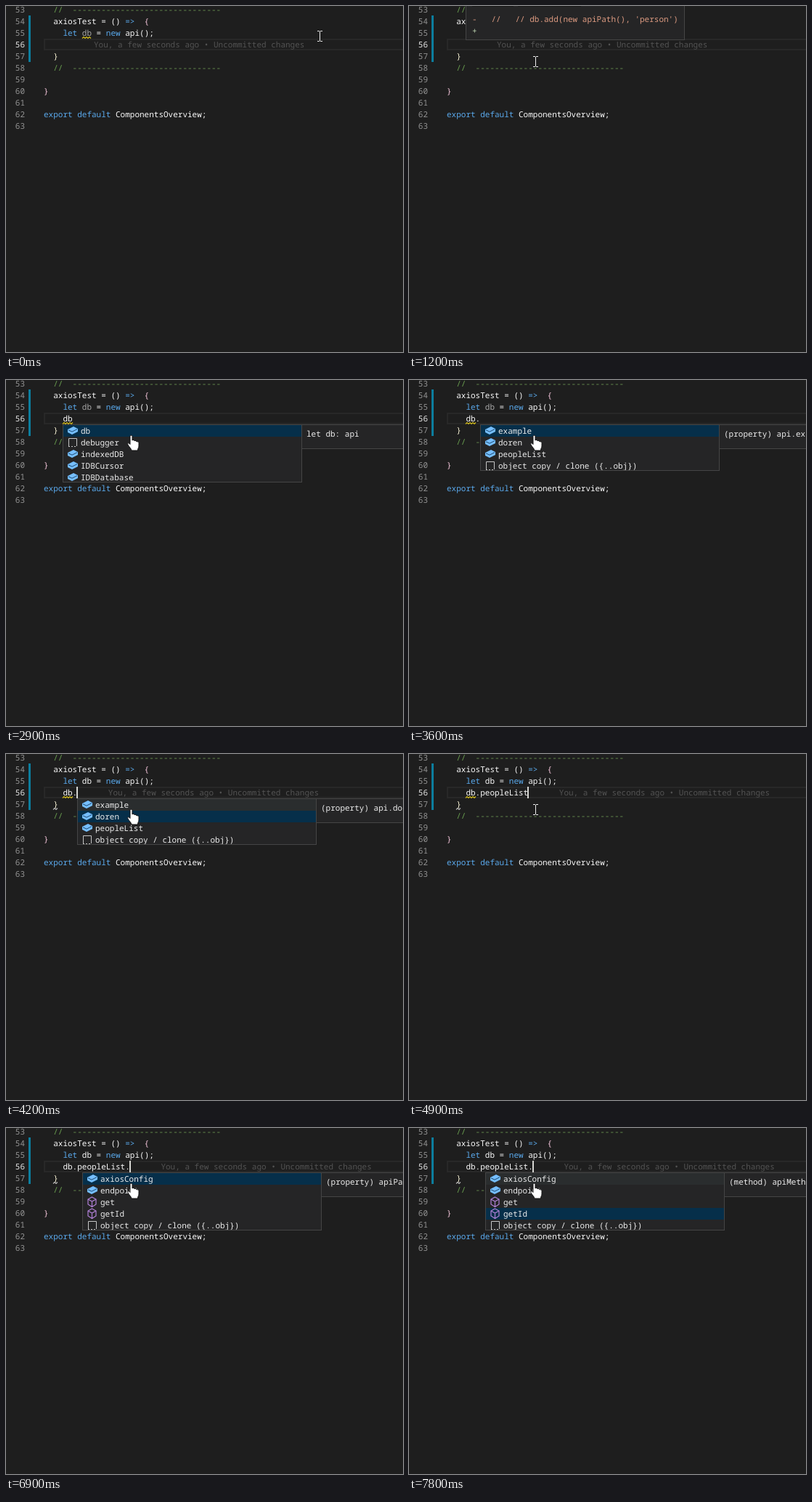
Write an HTML page that moves like this. It is 547 px wide and 476 px high and loops after 8 s.

```html
<!DOCTYPE html>
<html lang="en">
<head>
<meta charset="utf-8">
<title>Editor autocomplete</title>
<style>
html, body { margin: 0; width: 100%; height: 100%; overflow: hidden; background: #1e1e1e; }
#stage {
  position: relative; width: 547px; height: 476px; overflow: hidden; color: #fafafa;
  font: 11px/18px "Noto Sans Mono", "DejaVu Sans Mono", monospace;
  text-rendering: geometricPrecision; font-variant-ligatures: none; cursor: default;
}
#stage div, #stage svg { position: absolute; white-space: pre; box-sizing: border-box; }
#stage svg { overflow: visible; }
.num { left: 0; width: 26px; text-align: right; color: #929292; }
.num.on { color: #e6e6e6; }
.bar { left: 31px; top: 13px; width: 3px; height: 64px; background: #0c7d9d; }
.row { left: 52px; top: 45px; width: 520px; height: 16px; border: 2px solid #282828; }
.k { color: #5aa9ec; }
.c { color: #6a9f50; }
.d { color: #6a9352; }
.p { color: #f6c6dc; }
.y { color: #f4efd2; }
.dim { color: #a6a6a6; }
.note { color: #535353; }
.caret { top: 45px; width: 2px; height: 16px; background: #d6d6d2; }
.box { background: #252526; border: 1px solid #454545; overflow: hidden; }
.box .item { color: #ececec; }
.sel { background: #062f4a; }
.hov { background: #2a2d2e; }
.edge { background: #191919; }
.old { color: #dc9a80; }
.new { color: #c0d8b4; }
</style>
</head>
<body>
<div id="stage"><div id="text"></div><div id="live"></div></div>
<script>
const LOOP = 8000, X0 = 52, CW = 6.6, TOP = 45;
const BLAME = 'You, a few seconds ago \u2022 Uncommitted changes';
const COPY = ['snip', 'object copy / clone ({..obj})'];

const lists = {
  word: { x: 78, rows: [['field', 'db'], ['snip', 'debugger'], ['field', 'indexedDB'],
    ['field', 'IDBCursor'], ['field', 'IDBDatabase']], docs: ['let db: api'] },
  api: { x: 98, rows: [['field', 'example'], ['field', 'doren'], ['field', 'peopleList'], COPY],
    docs: ['(property) api.example', '(property) api.doren', '(property) api.peopleList'] },
  path: { x: 105, rows: [['field', 'axiosConfig'], ['field', 'endpoint'], ['cube', 'get'],
    ['cube', 'getId'], COPY],
    docs: ['(property) apiPath.axiosConfig', '(property) apiPath.endpoint',
      '(method) apiMethods.get', '(method) apiMethods.getId'] }
};

// Each step changes part of the state from its time on.
const steps = [
  [0, { typed: '', caret: 0, blame: 1, hover: 0, list: '', sel: 0, mouse: [432, 41],
        unused: 1, warnTop: 1, warn: 0, brace: 0, bulb: 0 }],
  [100, { mouse: [408, 44] }],
  [200, { mouse: [340, 50] }],
  [300, { mouse: [268, 55] }],
  [400, { mouse: [214, 59] }],
  [500, { mouse: [192, 60] }],
  [600, { caret: 1 }],
  [700, { hover: 1 }],
  [1000, { mouse: [184, 65] }],
  [1100, { mouse: [177, 73], caret: 0 }],
  [1200, { mouse: [174, 76] }],
  [1300, { hover: 0 }],
  [1600, { caret: 1 }],
  [2100, { caret: 0 }],
  [2300, { typed: 'd', caret: 1, blame: 0 }],
  [2400, { typed: 'db' }],
  [2500, { list: 'word' }],
  [2800, { warnTop: 0, warn: 1 }],
  [2900, { caret: 0 }],
  [3100, { typed: 'db.', caret: 1, list: '' }],
  [3200, { list: 'api', bulb: 1 }],
  [3400, { bulb: 0 }],
  [3600, { caret: 0 }],
  [3700, { unused: 0 }],
  [3800, { brace: 1 }],
  [3900, { blame: 1 }],
  [4000, { caret: 1 }],
  [4200, { sel: 1 }],
  [4400, { sel: 2 }],
  [4500, { caret: 0 }],
  [4900, { typed: 'db.peopleList', caret: 1, list: '', sel: 0 }],
  [5200, { warn: 0 }],
  [5400, { caret: 0 }],
  [5500, { brace: 0 }],
  [5700, { typed: 'db.peopleList;', caret: 1, blame: 0 }],
  [6000, { blame: 1 }],
  [6100, { typed: 'db.peopleList', blame: 0 }],
  [6300, { typed: 'db.peopleList.' }],
  [6400, { list: 'path' }],
  [6500, { brace: 1 }],
  [6600, { caret: 0 }],
  [6800, { caret: 1 }],
  [6900, { blame: 1 }],
  [7300, { caret: 0, sel: 1 }],
  [7500, { sel: 2 }],
  [7600, { sel: 3 }],
  [7800, { caret: 1 }]
];
let last = {};
const states = steps.map(([, change]) => last = { ...last, ...change });

const div = (cls, x, y, html = '', w, h) =>
  `<div class="${cls}" style="left:${x}px;top:${y}px;` +
  `${w ? `width:${w}px;height:${h}px` : ''}">${html}</div>`;
const svg = (x, y, body) =>
  `<svg width="1" height="1" style="left:${x}px;top:${y}px" fill="none">${body}</svg>`;
const tint = (cls, s) => `<span class="${cls}">${s}</span>`;
const lineTop = n => TOP + (n - 56) * 16;
const code = (n, col, html) => div('', X0 + col * CW, lineTop(n), html);

function squiggle(x, y, w, color) {
  let d = 'M0 2.5';
  for (let i = 2; i <= w; i += 2) d += `L${i} ${i % 4 ? .5 : 2.5}`;
  return svg(x, y, `<path d="${d}" stroke="${color}" stroke-width="1.2"/>`);
}

const icons = {
  field: '<path d="M0 4L8 0L14 3V7L6 11L0 8Z" fill="#75beff"/>' +
    '<path d="M1 4.8L6 7.2L13 3.6" stroke="#1d4a70"/>',
  cube: '<path d="M6.5 -1L12 2V9L6.5 12.5L1 9V2ZM1 2L6.5 5L12 2M6.5 5V12" stroke="#b180d7" stroke-width="1.2"/>',
  snip: '<path d="M1.5 11V.5H12.5V11" stroke="#c5c5c5"/><path d="M1 11.5H13" stroke="#c5c5c5" stroke-dasharray="2 2"/>'
};

function popup({ x, rows, docs }, sel) {
  let body = '';
  rows.forEach(([icon, label], i) => {
    const y = i * 16;
    const cls = i === sel ? 'sel' : i === 0 ? 'hov' : '';
    body += div(cls, 0, y, '', 328, 16) + svg(6, y + 2, icons[icon]) + div('item', 24, y, label);
  });
  return div('box', x, 61, body, 330, rows.length * 16) +
    div('box', x + 329, 61, div('item', 6, 4, docs[sel]), 300, 34);
}

const hoverBox = () => div('box', 78, -40,
  div('edge', 8, 38, '', 57, 2) + div('edge', 71, 38, '', 87, 2) +
  div('old', 8, 49, "-   //   // db.add(new apiPath(), 'person')") +
  div('new', 8, 65, '+'), 302, 87);

const bulb = () => svg(58, 46,
  '<path d="M3 9C-1 6 1 1 5 1S11 6 7 9Z" fill="#ffcc00"/><path d="M3 10.5H7M3 12.5H7" stroke="#c5c5c5"/>');

function pointer([x, y], hand) {
  if (hand) return svg(x - 7, y,
    '<path d="M4 1.5C4 -.2 7 -.2 7 1.5V7C8 6 10 6.3 10 7.8C11 7 13 7.4 13 9C14 8.3 16 9 16 10.5V15' +
    'C16 17 14.5 18 14.5 21H6C5.5 18 2 15.5 .8 12.5C0 10.6 2 10 4 12.5Z" fill="#fff" stroke="#111"/>');
  return svg(x, y,
    '<path d="M-3 -6.5H0M1 -6.5H4M.5 -6V7M-3 7.5H0M1 7.5H4" stroke="#f0f0f0"/>');
}

function drawText() {
  let out = '<div class="row"></div><div class="bar"></div>';
  for (let n = 53; n <= 63; n++)
    out += `<div class="num${n === 56 ? ' on' : ''}" style="top:${lineTop(n)}px">${n}</div>`;
  const rule = tint('c', '//') + '  ' + tint('d', '-'.repeat(31));
  return out + code(53, 2, rule) +
    code(54, 2, `axiosTest = () ${tint('k', '=&gt;')}  ${tint('p', '{')}`) +
    code(57, 2, tint('y', '}')) + code(58, 2, rule) + code(60, 0, tint('p', '}')) +
    code(62, 0, tint('k', 'export default') + ' ComponentsOverview;');
}

function drawLive(s) {
  const end = 4 + s.typed.length;
  let out = code(55, 4, `${tint('k', 'let')} ${tint(s.unused ? 'dim' : '', 'db')} = ${tint('k', 'new')} api();`);
  out += code(56, 4, s.typed);
  if (s.blame) out += div('note', X0 + end * CW + 42.6, TOP, BLAME);
  if (s.warnTop) out += squiggle(105, 42, 13, '#d8c01c');
  if (s.warn) out += squiggle(78, 58, 14, '#d8c01c');
  if (s.brace) out += squiggle(65, 74, 7, '#b8b8b8');
  if (s.caret) out += div('caret', Math.floor(51.5 + end * CW), TOP);
  if (s.bulb) out += bulb();
  if (s.hover) out += hoverBox();
  if (s.list) out += popup(lists[s.list], s.sel);
  return out + pointer(s.mouse, s.list);
}

const live = document.getElementById('live');
document.getElementById('text').innerHTML = drawText();
const start = performance.now();
let shown = -1;
function tick() {
  const t = (performance.now() - start) % LOOP;
  let i = steps.length - 1;
  while (steps[i][0] > t) i--;
  if (i !== shown) live.innerHTML = drawLive(states[shown = i]);
  requestAnimationFrame(tick);
}
tick();
</script>
</body>
</html>
```
